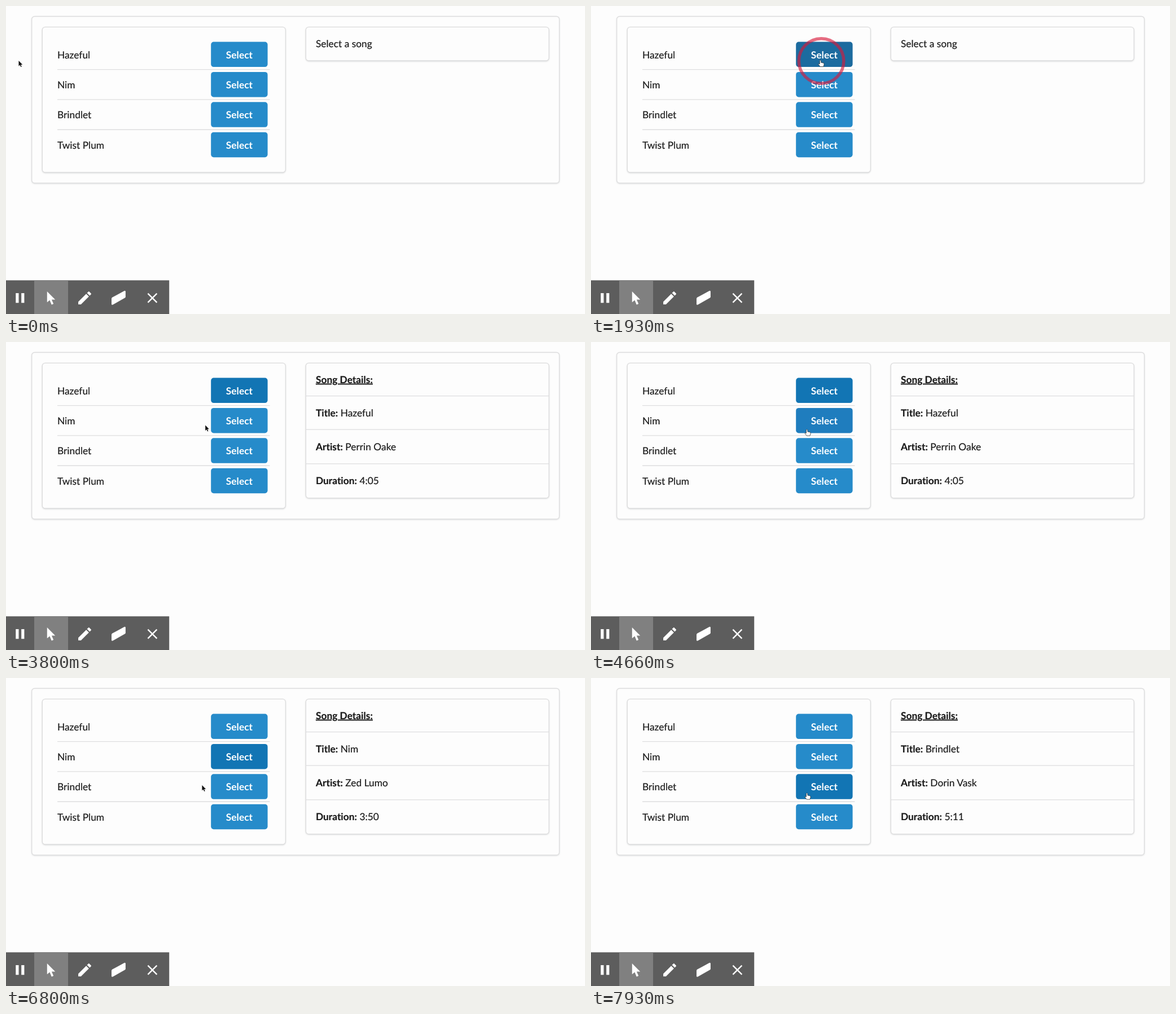
These frames come from a looping animation (1026 by 546 pixels, 8000 ms). An HTML page:

```html
<!DOCTYPE html>
<html lang="en">
<head>
<meta charset="utf-8">
<title>Song picker</title>
<style>
  html, body { margin: 0; width: 100%; height: 100%; overflow: hidden; background: #fdfdfd; }
  svg { display: block; width: 1026px; height: 546px; }
  text {
    font: 17.35px Lato, sans-serif; font-variant-ligatures: none; text-rendering: geometricPrecision;
    fill: #1b1b1b; stroke: #1b1b1b; stroke-width: .2; white-space: pre;
  }
  .b { font-weight: 700; }
  .btn { fill: #fff; stroke: none; font-weight: 700; text-anchor: middle; }
  .card { fill: #fdfdfd; stroke: #dcdcdd; stroke-width: 1.3; filter: drop-shadow(0 1.2px 1.1px rgba(34, 36, 38, .13)); }
  .rule { stroke: #dededf; stroke-width: 1.3; }
</style>
</head>
<body>
<svg id="stage" viewBox="0 0 1026 546">
  <rect width="1026" height="546" fill="#fdfdfd"/>
  <rect class="card" x="45.7" y="18.5" width="934.8" height="295.3" rx="5"/>
  <rect class="card" x="64.3" y="37.4" width="431" height="257.6" rx="5"/>
  <g id="list"></g>
  <rect id="panel" class="card" x="531.3" y="37.4" width="430.8" height="59.6" rx="5"/>
  <text id="prompt" x="549" y="73.4">Select a song</text>
  <g id="details">
    <path class="rule" d="M531.3 95.6H962M531.3 155.2H962M531.3 215.9H962"/>
    <text class="b" x="549" y="72.7" text-decoration="underline">Song Details:</text>
  </g>
  <g id="toolbar" fill="#fff">
    <rect y="486.3" width="289.2" height="60" fill="#5d5d5d"/>
    <rect x="50" y="486.3" width="60" height="60" fill="#808080"/>
    <path d="M17.3 509h5.2v17.2h-5.2zM27.2 509h5.2v17.2h-5.2z"/>
    <path d="M72.8 506V525.2L77.4 521.6 80.8 529.4 84.2 528 80.9 520.6H87.2Z"/>
    <path transform="translate(124.3 502.3) scale(1.27)" d="M3 17.25V21h3.75L17.81 9.94l-3.75-3.75zM20.7 7a1 1 0 0 0 0-1.4L18.4 3.3a1 1 0 0 0-1.4 0l-1.85 1.85 3.75 3.75z"/>
    <path d="M187 518.9Q187 517.4 188.4 516.6L209.6 505.1Q211.9 504.1 211.9 506.4V515.2Q211.9 516.8 210.5 517.6L189.4 529.5Q187 530.6 187 528.2Z"/>
    <path d="M251.4 509.6L267.4 525.6M267.4 509.6L251.4 525.6" stroke="#fff" stroke-width="2.4"/>
  </g>
  <g id="cursor">
    <path id="arrow" d="M0 0V9.6L2.2 7.5 3.8 11 5.3 10.4 3.7 6.9H6.7Z" fill="#111" stroke="#fff" stroke-width=".8" paint-order="stroke"/>
    <path id="hand" d="M-1.2 .8Q0 -1 1.2 .8V3.9L5.4 4.8Q6.8 5.2 6.5 7.5L5.4 11.2H-.4L-3.6 7Q-3.6 5 -1.2 6.6Z" fill="#fff" stroke="#222" stroke-width=".7"/>
  </g>
  <circle id="ring" r="39.8" fill="none" stroke="#d9183a" stroke-width="5.4"/>
</svg>
<script>
const $ = id => document.getElementById(id);
const LOOP = 8000;
const songs = [
  { title: 'Hazeful', artist: 'Perrin Oake', time: '4:05' },
  { title: 'Nim', artist: 'Zed Lumo', time: '3:50' },
  { title: 'Brindlet', artist: 'Dorin Vask', time: '5:11' },
  { title: 'Twist Plum' }
];
const BTN = { x: 363.2, y: 63.6, w: 100.4, h: 44.5, step: 53.35 };

const idle = [38, 139, 202], hover = [31, 125, 190], focus = [18, 117, 180], down = [28, 107, 159];

// Moments at which each button heads for a new colour
const shades = [
  [[0, idle], [1440, hover], [1860, down], [2050, focus], [5070, idle]],
  [[0, idle], [4090, hover], [5010, down], [5190, focus], [7490, idle]],
  [[0, idle], [7130, hover], [7480, down], [7660, focus]],
  [[0, idle]]
];
const clicks = [1915, 5055, 7525];
const picks = [2050, 5190, 7660];
const RING = 270;

// Pointer hot spot: time, x, y
const path = [
  [0, 22.5, 97], [580, 22.5, 97], [800, 92, 99], [1100, 245, 99], [1400, 355, 98],
  [1600, 396, 97], [1800, 406.5, 96.3], [2830, 406.5, 96.3], [3060, 389.6, 95],
  [3350, 355, 111], [3660, 351, 140], [3900, 356, 151], [4130, 366, 155],
  [4400, 379, 155.5], [4640, 382.6, 155], [6100, 382.6, 155], [6350, 362, 166],
  [6600, 346.5, 186], [6800, 347.4, 190], [6930, 349, 193], [7130, 364, 200],
  [7400, 382.6, 204], [8000, 382.6, 204]
];

function add(parent, tag, attrs, text) {
  const el = document.createElementNS('http://www.w3.org/2000/svg', tag);
  for (const k in attrs) el.setAttribute(k, attrs[k]);
  if (text) el.textContent = text;
  return parent.appendChild(el);
}

const buttons = songs.map((song, i) => {
  const y = BTN.y + i * BTN.step, base = y + 28.9;
  if (i) add($('list'), 'path', { class: 'rule', d: `M91 ${y - 4.4}H467.5` });
  add($('list'), 'text', { x: 91, y: base }, song.title);
  const rect = add($('list'), 'rect', { x: BTN.x, y, width: BTN.w, height: BTN.h, rx: 4.8 });
  add($('list'), 'text', { class: 'btn', x: BTN.x + BTN.w / 2, y: base }, 'Select');
  return rect;
});

const values = ['Title:', 'Artist:', 'Duration:'].map((label, i) => {
  const line = add($('details'), 'text', { x: 549, y: [132, 192.4, 252.4][i] });
  add(line, 'tspan', { class: 'b' }, label);
  return add(line, 'tspan', {}, ' ');
});

function shade(keys, t) {
  let i = keys.length - 1;
  while (i && keys[i][0] > t) i--;
  const [start, to] = keys[i], from = i ? keys[i - 1][1] : to;
  const u = Math.min(1, (t - start) / 60);
  return `rgb(${to.map((c, k) => Math.round(from[k] + (c - from[k]) * u))})`;
}

// Monotone cubic through the path points
function along(t, axis) {
  let i = 0;
  while (i < path.length - 2 && path[i + 1][0] <= t) i++;
  const slope = j => j < 0 || j > path.length - 2 ? 0 :
    (path[j + 1][axis] - path[j][axis]) / (path[j + 1][0] - path[j][0]);
  const tangent = j => {
    const a = slope(j - 1), b = slope(j);
    return a * b > 0 ? 2 * a * b / (a + b) : 0;
  };
  const span = path[i + 1][0] - path[i][0], u = (t - path[i][0]) / span, v = 1 - u;
  return path[i][axis] * v * v * (1 + 2 * u) + path[i + 1][axis] * u * u * (3 - 2 * u)
    + span * u * v * (tangent(i) * v - tangent(i + 1) * u);
}

const show = (el, on) => el.setAttribute('visibility', on ? 'visible' : 'hidden');

function overButton(x, y) {
  const dy = y - BTN.y;
  return x > BTN.x && x < BTN.x + BTN.w && dy > 0 && dy % BTN.step < BTN.h && dy < 4 * BTN.step;
}

function render(t) {
  buttons.forEach((b, i) => b.setAttribute('fill', shade(shades[i], t)));

  const picked = picks.filter(p => p <= t).length - 1;
  $('panel').setAttribute('height', picked < 0 ? 59.6 : 239.2);
  show($('prompt'), picked < 0);
  show($('details'), picked >= 0);
  if (picked >= 0) {
    const s = songs[picked];
    [s.title, s.artist, s.time].forEach((v, i) => { values[i].textContent = ' ' + v; });
  }

  const x = along(t, 1), y = along(t, 2), hand = overButton(x, y);
  $('cursor').setAttribute('transform', `translate(${x.toFixed(2)} ${y.toFixed(2)})`);
  show($('hand'), hand);
  show($('arrow'), !hand);

  const age = t - clicks.filter(c => c <= t).pop();
  const lit = age < RING;
  show($('ring'), lit);
  if (lit) {
    $('ring').setAttribute('cx', x + 1.6);
    $('ring').setAttribute('cy', y + 1.2);
    $('ring').setAttribute('opacity', 0.63 * Math.min(1, (RING - age) / 90));
  }
}

const begin = performance.now();
function tick() {
  render((performance.now() - begin) % LOOP);
  requestAnimationFrame(tick);
}
tick();
</script>
</body>
</html>
```
